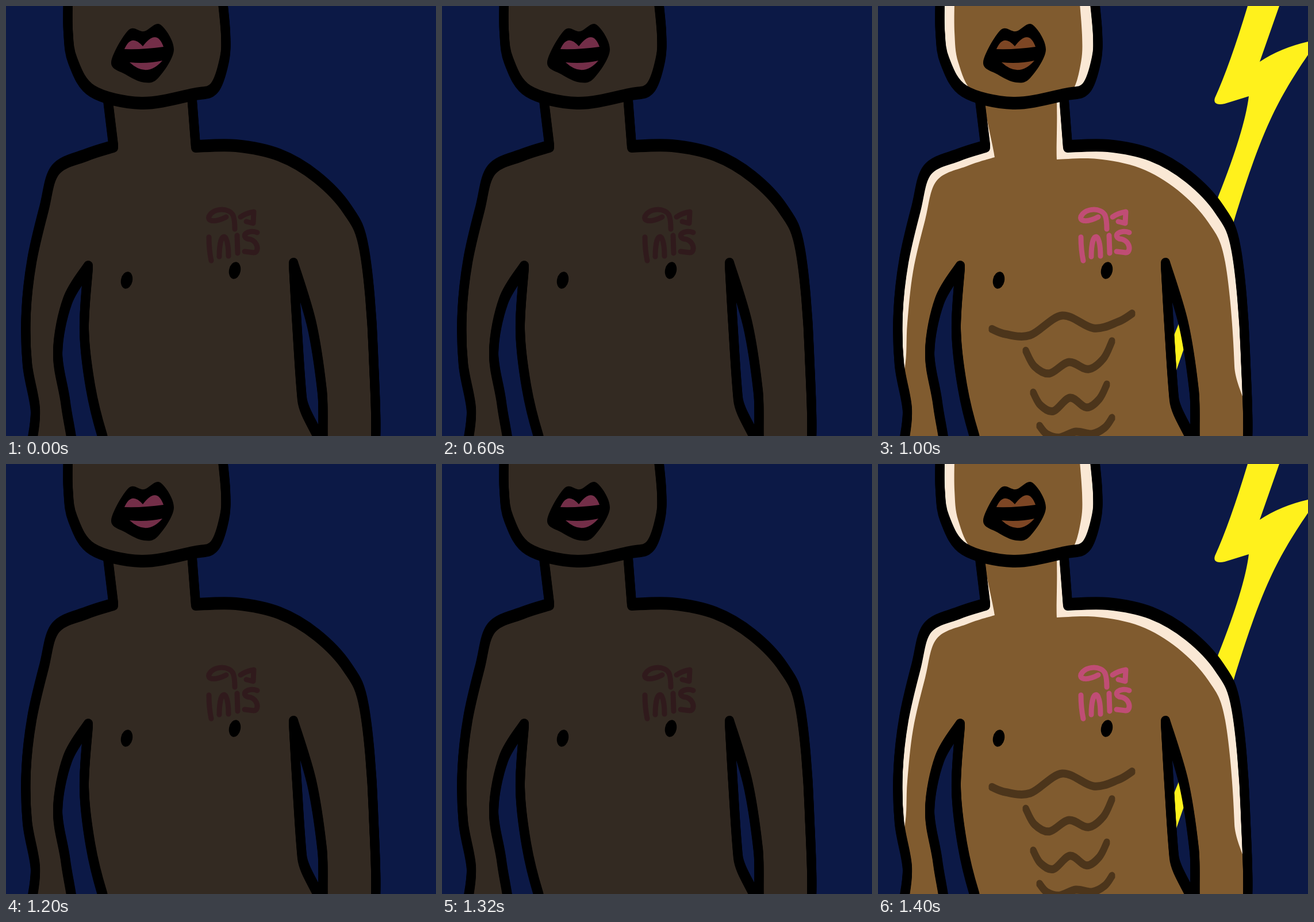
An HTML page with a canvas that plays this animation: 748x748 px, repeating every 1.6 s.

```html
<!DOCTYPE html>
<html lang="en">
<head>
<meta charset="utf-8">
<title>Lightning flash</title>
<style>
html, body { margin: 0; width: 100%; height: 100%; overflow: hidden; background: #0c1946; }
canvas { display: block; width: 100vw; height: 100vh; }
</style>
</head>
<body>
<canvas id="stage" width="748" height="748"></canvas>
<script>
const ctx = document.getElementById('stage').getContext('2d');
ctx.lineCap = ctx.lineJoin = 'round';

const DARK = { skin: '#332a22', lips: '#732e48', ink: '#301a1c' };
const LIT = { skin: '#805b2f', lips: '#7d4624', ink: '#c04d75' };
const NIGHT = '#0c1946', CREAM = '#fae8d5', YELLOW = '#fff11c', MUSCLE = '#4c351b';

const points = text => text.split(' ').map(s => s.split(',').map(Number));
const shift = (list, dx, dy) => list.map(([x, y]) => [x + dx, y + dy]);

// Smooth path through the points; a repeated point makes a corner.
function curve(p, closed = false) {
  const n = p.length;
  const at = i => closed ? p[(i + n) % n] : p[Math.max(0, Math.min(n - 1, i))];
  const path = new Path2D();
  path.moveTo(...p[0]);
  for (let i = 0; i < (closed ? n : n - 1); i++) {
    const [a, b, c, d] = [at(i - 1), at(i), at(i + 1), at(i + 2)];
    if (b[0] === c[0] && b[1] === c[1]) continue;
    path.bezierCurveTo(
      b[0] + (c[0] - a[0]) / 6, b[1] + (c[1] - a[1]) / 6,
      c[0] - (d[0] - b[0]) / 6, c[1] - (d[1] - b[1]) / 6, ...c);
  }
  return path;
}

// Outer sides run from neck to wrist, armpits from arm to waist.
const left = points('165,60 187,241 187,241 140,256 86,282 66,350 45,440 35,530 37,620 51,700 44,765 44,800');
const leftPit = points('114,800 104,690 90,600 107,510 143,451 143,451 136,560 147,660 168,746 190,800');
const rightPit = points('530,800 515,680 506,550 500,446 500,446 532,552 550,668 560,800');
const right = points('636,800 639,600 623,420 594,351 540,294 475,256 400,240 330,241 330,241 316,60');
const body = curve([...left, ...leftPit, ...rightPit, ...right]);

// The unlit area is the outline moved inwards; the left rim ends at the elbow.
const bodyTone = curve([
  ...shift(right, -19, 26), ...shift(left.slice(0, 8), 16, 22), [46, 632], [20, 700], [20, 800]
], true);

const jaw = points('108,-20 108,40 116,92 150,145 235,166 325,151 362,140 380,90 382,45 376,-20');
const head = curve(jaw);
const headTone = curve(jaw.map(([x, y]) => [240 + (x - 240) * 0.81, y + 6]));

const mouth = curve(points('183,98 213,42 240,44 268,32 292,76 265,125 240,133 208,119'), true);
const lips = new Path2D(`M206 75Q218 47 238 70Q262 38 274 71Q240 76 206 75Z
  M215 98Q245 101 272 95Q245 126 215 98Z`);

const nipples = new Path2D();
for (const [x, y] of [[210, 477], [398, 460]]) {
  nipples.moveTo(x, y);
  nipples.ellipse(x, y, 10, 15, 0.2, 0, 2 * Math.PI);
}

const tattoo = new Path2D(`M383 367C366 376 350 376 353 366C362 350 388 351 395 364Q398 372 398 388
  M408 367Q418 360 431 358L430 378L418 375M353 402Q353 424 357 443
  M371 436C371 390 387 390 387 435M402 399L403 430
  M437 394C420 388 408 400 420 405C438 406 442 428 431 429L415 427`);

// Tilted double arc: two hollows of depth sag with a peak at mid between them.
function ridge(x, y, half, sag, mid) {
  const shape = [[-1, 0], [-0.8, sag * 0.65], [-0.45, sag], [0, mid], [0.45, sag], [0.8, sag * 0.65], [1, 0]];
  return curve(shape.map(([u, v]) => [x + u * half, y + v - 0.11 * u * half]));
}
const muscles = [
  ridge(320, 547, 122, 18, -10),
  ridge(332, 590, 75, 44, 28),
  ridge(334, 664, 64, 36, 16),
  ridge(344, 722, 63, 24, 17)
];

const bolt = new Path2D(`M643 0H698L664 97Q700 73 748 62V85C690 170 665 225 618 378
  L530 602L505 674V597L523 553L592 331Q638 215 645 157L603 170Q582 174 586 160Q612 103 643 0Z`);

function fill(path, color) {
  ctx.fillStyle = color;
  ctx.fill(path);
}

// A tall nib makes level strokes heavier than upright ones.
function stroke(path, color, width, nib = 0) {
  ctx.strokeStyle = color;
  ctx.lineWidth = width;
  ctx.save();
  for (let y = 0; y <= nib; y += 3) {
    ctx.stroke(path);
    ctx.translate(0, 3);
  }
  ctx.restore();
}

function flesh(shape, tone, lit, skin) {
  fill(shape, lit ? CREAM : skin);
  if (!lit) return;
  ctx.save();
  ctx.clip(shape);
  fill(tone, skin);
  ctx.restore();
}

function draw(lit) {
  const colors = lit ? LIT : DARK;
  ctx.fillStyle = NIGHT;
  ctx.fillRect(0, 0, 748, 748);
  if (lit) fill(bolt, YELLOW);

  flesh(body, bodyTone, lit, colors.skin);
  if (lit) muscles.forEach(m => stroke(m, MUSCLE, 11, 3));
  stroke(body, '#000', 16, 6);

  flesh(head, headTone, lit, colors.skin);
  stroke(head, '#000', 16, 6);

  fill(mouth, '#000');
  fill(lips, colors.lips);
  fill(nipples, '#000');
  stroke(tattoo, colors.ink, 9);
}

function frame() {
  const t = performance.now() % 1600;
  draw(t >= 1000 && t < 1200 || t >= 1400);
  requestAnimationFrame(frame);
}
frame();
</script>
</body>
</html>
```
